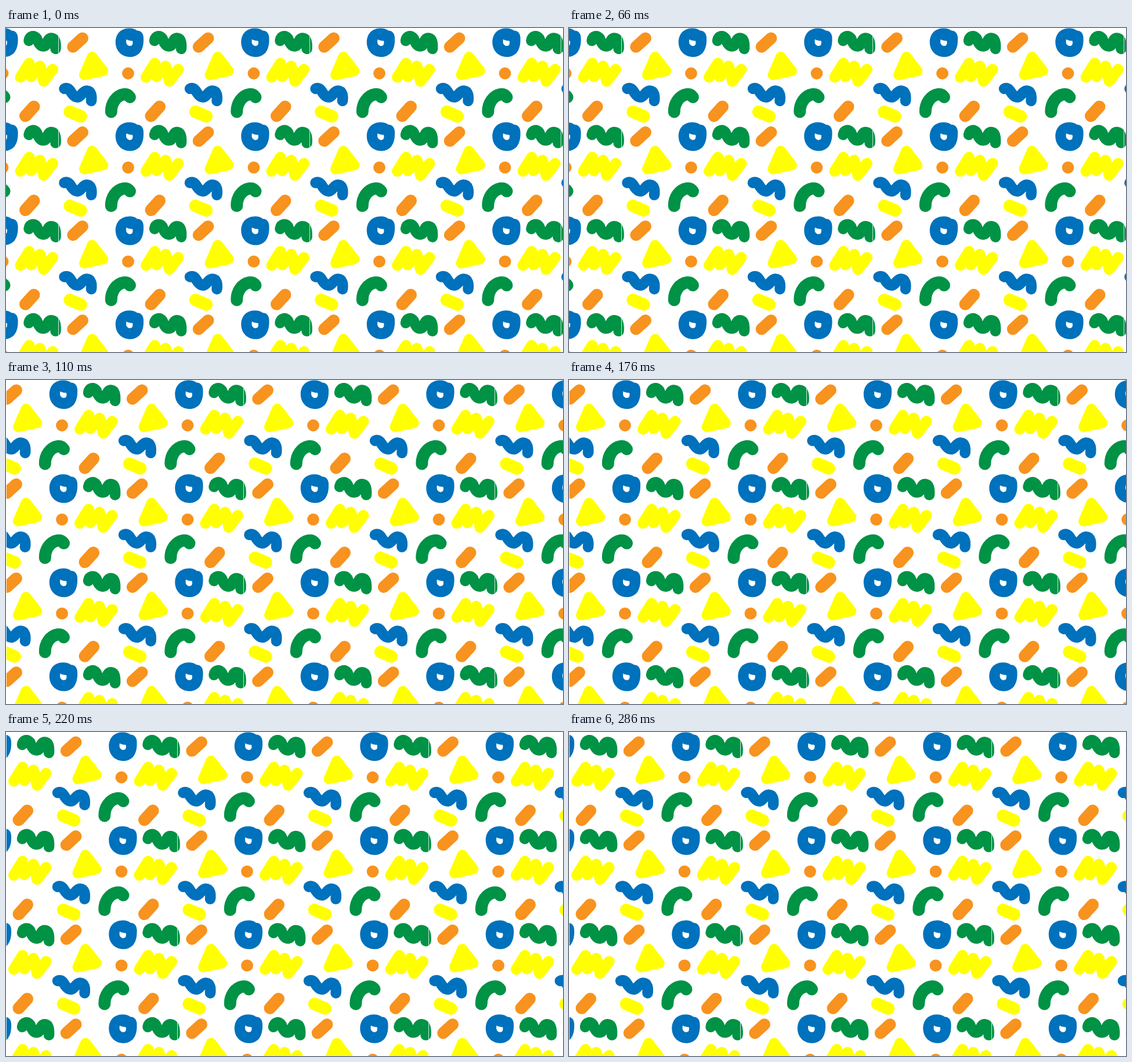
An HTML page with a canvas for the animation above (330 ms loop, 960 by 560 pixels).

```html
<!DOCTYPE html>
<html lang="en">
<head>
<meta charset="utf-8">
<title>Confetti pattern</title>
<style>
  html, body { margin: 0; width: 100%; height: 100%; overflow: hidden; background: #fff; }
  canvas { display: block; width: 960px; height: 560px; }
</style>
</head>
<body>
<canvas id="stage" width="960" height="560"></canvas>
<script>
const ctx = document.getElementById('stage').getContext('2d');
const W = 960, H = 560;
const TILE_W = 216.5, TILE_H = 162.6;
const STEP_MS = 110, STEPS = 3, STEP_X = -114;
const SEAM_X = 90.5;
const BLUE = '#0071bc', GREEN = '#009245', ORANGE = '#f7931e', YELLOW = '#ffff00';

const stroke = (color, width, d) => ({ color, width, path: new Path2D(d) });
const fill = (color, d) => ({ color, path: new Path2D(d) });

const triangle = 'M148.5 50L135 81.3L167.3 74.3Z';

const shapes = [
  // ring
  fill(BLUE, 'M211 .5C217 0 222 1.5 226 4.5C232 4.5 237 9 237 17C237.5 27 236 36 230.5 43' +
    'C225 48.5 219 50.2 212.5 50C199 49.5 189 39 188.8 25C188.8 10 198 1 211 .5Z' +
    'M207.5 19.5C210 21.5 214 22 218 22.2C219 25 218.5 28 217 30C214 32 210.5 31 208.5 28.5C206.5 26 207 22.5 207.5 19.5Z'),
  // squiggles
  stroke(GREEN, 18.5, 'M39.5 22C41 13 49 12 53 18C56 26 59 32 65 31.5C72 31 70 18 78 17.5C86 18 86 28 85.5 36'),
  stroke(BLUE, 18.5, 'M100.5 105C104 103 108 104 111 109C115 116 119 120 124 119.5C130 118 132 109 139 108.5C147 109 148 117 147 126'),
  stroke(YELLOW, 19, 'M25 85L40 61Q42 72 43 84L58.5 66Q63 78 65 92L80.5 71.5'),
  // capsules, dot and arc
  stroke(ORANGE, 20.5, 'M115.5 32.5L131.7 17.7'),
  stroke(ORANGE, 21, 'M33.5 152L48 136'),
  stroke(YELLOW, 21.5, 'M110 144.8L129 152.7'),
  stroke(ORANGE, 20.8, 'M210.5 78.5L210.51 78.5'),
  stroke(GREEN, 21, 'M181.3 145C181 130 190 117 203 114.7C208 114 211 116 213.5 119.5'),
  // triangle
  fill(YELLOW, triangle),
  stroke(YELLOW, 18, triangle),
  fill('#fff', 'M150 69h1.2v1h-1.2z')
];

function drawTile(x, y) {
  ctx.save();
  ctx.translate(x, y);
  for (const s of shapes) {
    if (s.width) {
      ctx.strokeStyle = s.color;
      ctx.lineWidth = s.width;
      ctx.stroke(s.path);
    } else {
      ctx.fillStyle = s.color;
      ctx.fill(s.path, 'evenodd');
    }
  }
  ctx.restore();
}

function draw(t) {
  const step = Math.floor(t / STEP_MS) % STEPS;
  const shift = step * STEP_X;
  ctx.fillStyle = '#fff';
  ctx.fillRect(0, 0, W, H);
  ctx.lineCap = ctx.lineJoin = 'round';

  for (let x = shift - TILE_W; x < W; x += TILE_W) {
    for (let y = 0; y < H; y += TILE_H) drawTile(x, y);
  }

  // hairline gaps where pattern blocks meet
  ctx.fillStyle = 'rgba(255, 255, 255, .8)';
  for (let x = shift + SEAM_X; x < W; x += 2 * TILE_W) {
    ctx.fillRect(Math.floor(x), 0, 1, H);
  }
  if (step > 0) ctx.fillRect(0, 0, 1, H);
}

const start = performance.now();
function tick() {
  draw(performance.now() - start);
  requestAnimationFrame(tick);
}
tick();
</script>
</body>
</html>
```
